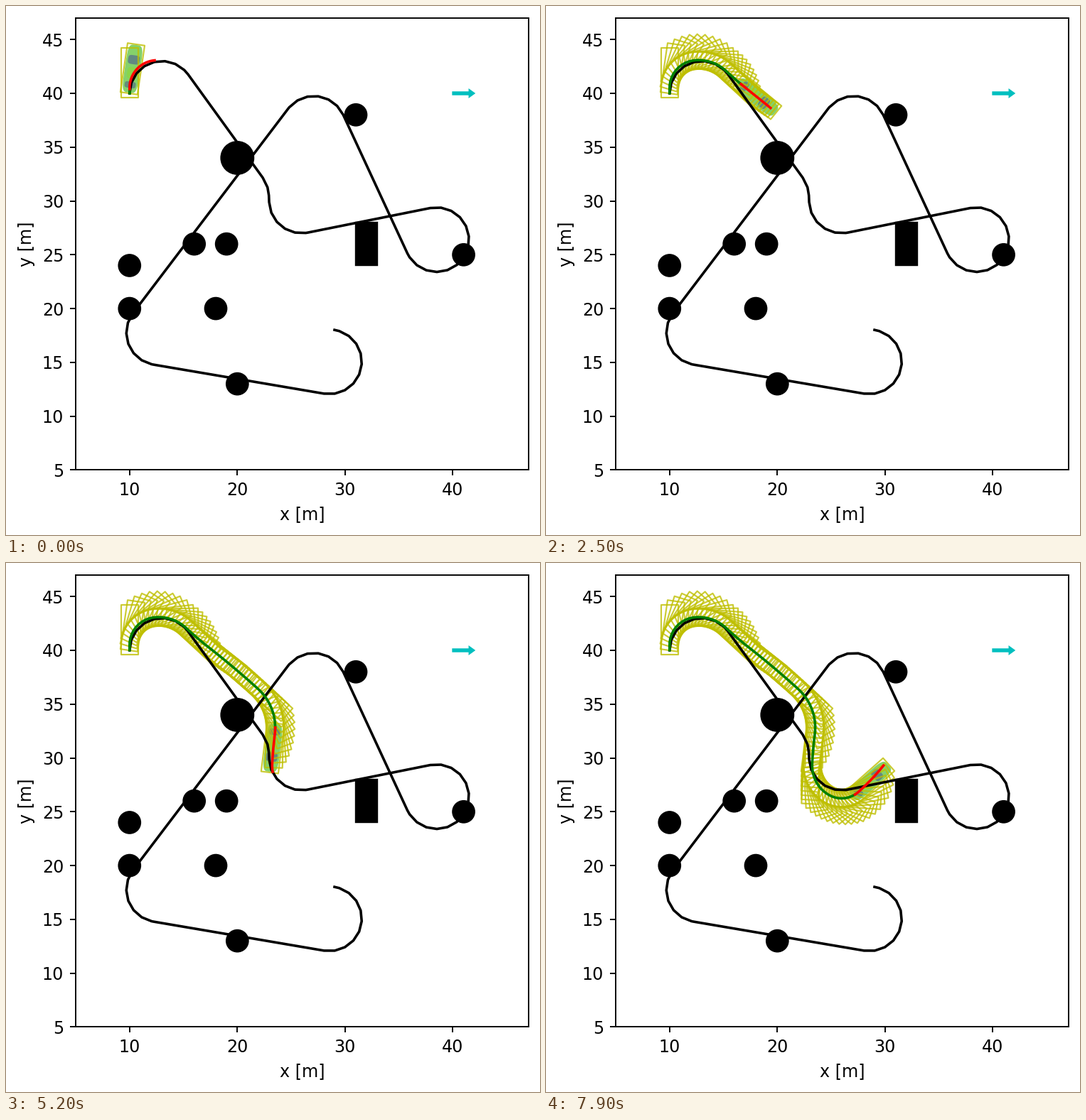
Write a matplotlib script that moves like this. It is 751x745 px and loops after 8 s.

```python
import numpy as np
import matplotlib.pyplot as plt
from matplotlib.animation import FuncAnimation
from matplotlib.collections import PolyCollection
from matplotlib.patches import Circle, Polygon, Rectangle

W, H, DPI = 751, 745, 172.3
FRAMES = 80
HORIZON = 10.5   # steps shown ahead of the car
LAG = 1.3        # steps by which the motion trails the heading
SUB = 20         # integration substeps per step

# The route winds around discs of one radius: centre and turn (1 left, -1 right)
RADIUS = 3
DISCS = [((13, 40), -1), ((19.93, 30.4), -1), ((25.95, 30), 1),
         ((38.5, 26.4), -1), ((27.1, 36.75), 1), ((12.7, 17.75), 1),
         ((28.55, 15.05), 1)]

# Driving plan: step, heading in degrees, speed per step
PLAN = np.array([
    (-1, 90, 0.38), (9, 6.5, 0.37), (18, -43, 0.35), (27, -38, 0.30),
    (42, -42, 0.46), (52, -97, 0.47), (59, -93, 0.36), (70, -26.6, 0.31),
    (79, 41.6, 0.31), (91, 54, 0.43),
])


def tangent(a, b):
    """Heading of the straight that leaves disc a and joins disc b."""
    (pa, sa), (pb, sb) = a, b
    dx, dy = np.subtract(pb, pa)
    return np.arctan2(dy, dx) + np.arcsin(RADIUS * (sa - sb) / np.hypot(dx, dy))


def wind(discs, first, last):
    """Join arcs, sampled at unit length, with straight tangents."""
    turns = [first, *map(tangent, discs, discs[1:]), last]
    arcs = []
    for (c, s), a, b in zip(discs, turns, turns[1:]):
        sweep = (s * (b - a)) % (2 * np.pi)
        phi = a + s * np.append(np.arange(0, sweep, 1 / RADIUS), sweep)
        arcs.append(c + s * RADIUS * np.column_stack([np.sin(phi), -np.cos(phi)]))
    return np.vstack(arcs)


def drive():
    """Rear axle poses (x, y, heading in radians) at every substep."""
    t = np.arange(-SUB, (FRAMES + HORIZON) * SUB) / SUB
    steps, angle, speed = PLAN.T
    course = np.radians(np.interp(t - LAG, steps, angle))
    v = np.interp(t, steps, speed) / SUB
    x = 10 + np.cumsum(v * np.cos(course))
    y = 40 + np.cumsum(v * np.sin(course))
    return np.column_stack([x, y, np.radians(np.interp(t, steps, angle))])


def place(shape, p):
    c, s = np.cos(p[2]), np.sin(p[2])
    return shape @ np.array([[c, s], [-s, c]]) + p[:2]


def blob(cx, rx, ry, power):
    """Superellipse around (cx, 0)."""
    a = np.linspace(0, 2 * np.pi, 80)
    c, s = np.cos(a), np.sin(a)
    return np.column_stack([cx + rx * np.sign(c) * abs(c)**power,
                            ry * np.sign(s) * abs(s)**power])


BOX = np.array([(-0.4, -0.8), (4.2, -0.8), (4.2, 0.8), (-0.4, 0.8)])
CAR = [
    (blob(1.9, 2.24, 0.72, 0.45), (0.36, 0.76, 0.22, 0.75)),
    (blob(2.75, 0.42, 0.54, 0.5), (0.32, 0.42, 0.55, 0.7)),
    (blob(0.4, 0.3, 0.52, 0.5), (0.32, 0.42, 0.52, 0.65)),
    (blob(1.5, 0.55, 0.45, 0.6), (0.55, 0.86, 0.2, 0.6)),
]
poses = drive()

fig = plt.figure(figsize=((W + 1e-3) / DPI, (H + 1e-3) / DPI), dpi=DPI,
                 facecolor="white")
ax = fig.add_axes([98 / W, 91.6 / H, 636.5 / W, 636.5 / H])
ax.set(xlim=(5, 47), ylim=(5, 47), xlabel="x [m]", ylabel="y [m]",
       xticks=range(10, 41, 10), yticks=range(5, 46, 5))

for x, y in [(10, 24), (10, 20), (16, 26), (19, 26), (18, 20), (20, 13),
             (31, 38), (41, 25)]:
    ax.add_patch(Circle((x, y), 1, color="k", lw=1))
ax.add_patch(Circle((20, 34), 1.5, color="k", lw=1))
ax.add_patch(Rectangle((31, 24), 2, 4, color="k", lw=1))
ax.arrow(39.93, 40, 2.17, 0, width=0.36, head_width=0.92, head_length=0.64,
         length_includes_head=True, color="c", lw=0)

car = [ax.add_patch(Polygon(s, fc=c, ec="none", zorder=0.8)) for s, c in CAR]
boxes = PolyCollection([], facecolors="none", edgecolors=(0.75, 0.75, 0, 0.8),
                       linewidths=0.9, zorder=0.9)
ax.add_collection(boxes, autolim=False)
ax.plot(*wind(DISCS, np.pi / 2, np.radians(171)).T, "k", lw=1.5)
trail, = ax.plot([], [], "g", lw=1.5)
plan, = ax.plot([], [], "r", lw=1.5)


def update(n):
    now = (n + 1) * SUB
    past = poses[:now + 1:SUB]
    ahead = poses[now:now + int(HORIZON * SUB)]
    boxes.set_verts([place(BOX, p) for p in past])
    trail.set_data(past[:, 0], past[:, 1])
    plan.set_data(ahead[:, 0], ahead[:, 1])
    for patch, (shape, _) in zip(car, CAR):
        patch.set_xy(place(shape, past[-1]))
    return [boxes, trail, plan, *car]


anim = FuncAnimation(fig, update, frames=FRAMES, interval=100, repeat=True,
                     repeat_delay=0, blit=False)
plt.show()
```
